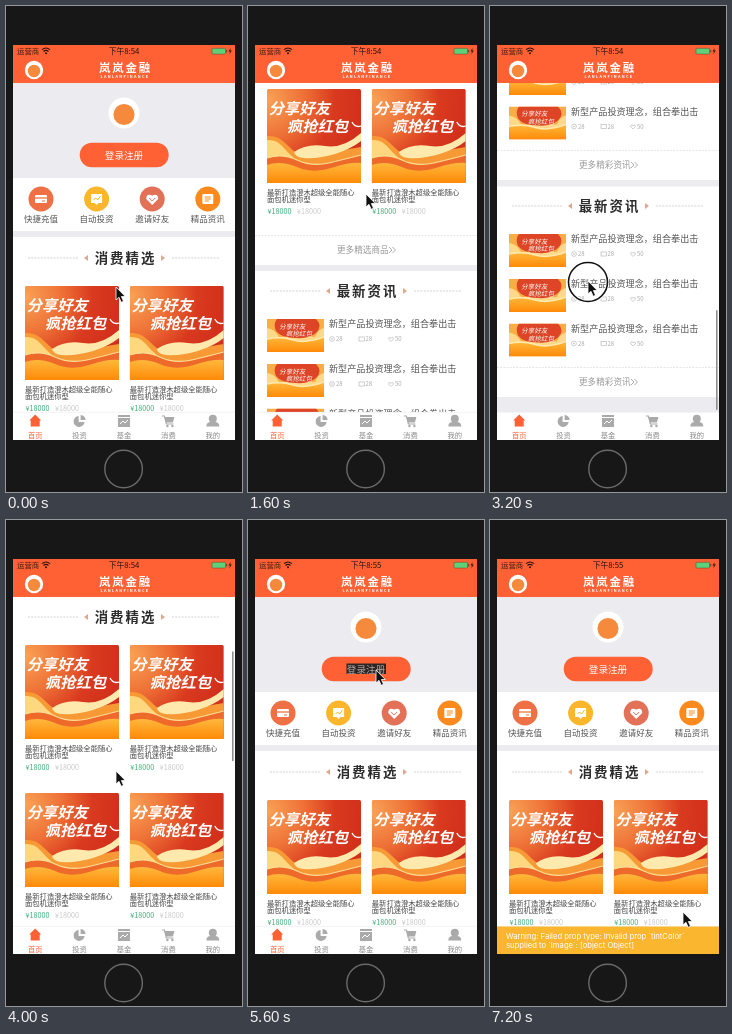
Animation, 236 px wide and 486 px high, one loop 8000 ms. Source, as an HTML page:

```html
<!DOCTYPE html>
<html lang="zh-CN">
<head>
<meta charset="utf-8">
<title>App demo</title>
<style>
html, body { margin: 0; width: 100%; height: 100%; overflow: hidden; background: #171717; }
svg { display: block; width: 100vw; height: 100vh; }
text { font-family: "Noto Sans CJK SC", "Noto Sans CJK", "Noto Sans", sans-serif; }
</style>
</head>
<body>
<svg id="stage" viewBox="0 0 236 486" xmlns="http://www.w3.org/2000/svg"></svg>
<script>
const ORANGE = '#ff6034', PALE = '#ebebf0', INK = '#555', DARK = '#171717';

const rect = (x, y, w, h, fill, extra = '') =>
  `<rect x="${x}" y="${y}" width="${w}" height="${h}" fill="${fill}" ${extra}/>`;
const circle = (x, y, r, fill, extra = '') =>
  `<circle cx="${x}" cy="${y}" r="${r}" fill="${fill}" ${extra}/>`;
const path = (d, fill, extra = '') => `<path d="${d}" fill="${fill}" ${extra}/>`;
const line = (d, color, width = 1, extra = '') =>
  path(d, 'none', `stroke="${color}" stroke-width="${width}" ${extra}`);
// y is the vertical middle of the glyphs
const text = (x, y, size, fill, str, extra = '') =>
  `<text x="${x}" y="${y + size * 0.37}" font-size="${size}" fill="${fill}" ${extra}>${str}</text>`;
const mid = (x, y, size, fill, str, extra = '') =>
  text(x, y, size, fill, str, 'text-anchor="middle" ' + extra);
const group = (x, y, body, extra = '') =>
  `<g transform="translate(${x} ${y})" ${extra}>${body}</g>`;

const slogan = 'font-weight="700" transform="translate(7 0) skewX(-12)"';
const defs = `<defs>
  <radialGradient id="sky" cx="0" cy="0.12" r="1">
    <stop offset="0" stop-color="#f9a357"/><stop offset="0.4" stop-color="#ee7036"/>
    <stop offset="0.72" stop-color="#d93a1f"/><stop offset="1" stop-color="#d2301b"/>
  </radialGradient>
  <linearGradient id="gold" x1="0" y1="0" x2="0" y2="1">
    <stop offset="0" stop-color="#ffb83c"/><stop offset="1" stop-color="#ff8a08"/>
  </linearGradient>
  <clipPath id="square"><rect width="94" height="94" rx="1.5"/></clipPath>
  <clipPath id="wide"><rect width="57" height="33"/></clipPath>
  <clipPath id="view"><rect x="7" y="77" width="222" height="329"/></clipPath>
  <g id="poster" clip-path="url(#square)">
    ${rect(0, 0, 94, 94, 'url(#sky)')}
    ${path('M0 47Q10 46 17 53T34 68L94 58V94H0Z', '#f79a35')}
    ${path('M0 51Q9 50 15 57T28 70H0Z', '#ffd77f')}
    ${path('M27 63Q40 54 58 57T94 44V52Q84 60 68 65T36 69Q28 68 27 63Z', '#ffe9ad')}
    ${path('M0 69Q15 64 30 71T62 74T94 66V94H0Z', '#ee6a2a')}
    ${path('M0 76Q14 71 30 78T64 79T94 74V94H0Z', 'url(#gold)')}
    ${line('M0 69Q15 64 30 71T62 74T94 66', '#ffdc94', 1.2)}
    ${text(0, 19.5, 15.4, '#fff', '分享好友', slogan)}
    ${text(22, 37, 15.4, '#fff', '疯抢红包', slogan)}
    ${line('M85 33Q88 39 94 37', '#fff', 1.3)}
  </g>
  <g id="thumb" clip-path="url(#wide)">
    ${rect(0, 0, 57, 33, '#f9ad45')}
    ${path('M0 9Q8 10 12 18H48Q51 10 57 9V24H0Z', '#ffd98a')}
    ${path('M10 0H49Q56 7 49 14Q42 20 29 19Q14 19 9 12Q6 5 10 0Z', '#dd4526')}
    ${path('M0 20Q14 17 26 21T57 18V33H0Z', 'url(#gold)')}
    ${line('M0 20Q14 17 26 21T57 18', '#ffe9ad', 1.6)}
    ${text(14, 7.5, 6.6, '#fff', '分享好友', 'font-weight="500" transform="skewX(-10)"')}
    ${text(22, 15, 6.6, '#fff', '疯抢红包', 'font-weight="500" transform="skewX(-10)"')}
  </g>
</defs>`;

function heading(y, label) {
  const dash = 'stroke-dasharray="2 1.2"';
  return line(`M22 ${y}H72M166 ${y}H214`, '#cfc8c5', 0.8, dash)
    + path(`M82 ${y - 3}V${y + 3}L78 ${y}Z`, '#dfa88e')
    + path(`M155 ${y - 3}V${y + 3}L159 ${y}Z`, '#dfa88e')
    + mid(119.5, y, 13.4, '#2c2c2c', label, 'font-weight="700" letter-spacing="2"');
}

function card(x, y) {
  return group(x, y, '<use href="#poster"/>'
    + text(0, 103, 7.3, '#444', '最新打造澄木超级全能随心')
    + text(0, 110.5, 7.3, '#444', '面包机迷你型')
    + text(0.5, 122, 7.2, '#3fae78', '¥18000')
    + text(30, 122, 7.2, '#c8c8c8', '¥18000'));
}

function news(y) {
  const icons = [
    circle(3, 20, 2.4, 'none', 'stroke="#bbb" stroke-width=".7"') + circle(3, 20, 0.8, '#bbb'),
    rect(0.5, 18, 5.5, 4, 'none', 'stroke="#bbb" stroke-width=".7"'),
    line('M3 22.5L.5 20Q.5 17.5 3 19Q5.5 17.5 5.5 20Z', '#bbb', 0.7)
  ];
  const counts = [28, 28, 50];
  return group(19, y, '<use href="#thumb"/>'
    + text(62, 5, 9.1, INK, '新型产品投资理念，组合拳出击')
    + icons.map((icon, i) => group(62 + i * 29.5, 0, icon + text(7, 20, 6, '#aaa', counts[i]))).join(''));
}

const more = (y, label) =>
  line(`M7 ${y - 14.5}H229`, '#ddd', 0.7, 'stroke-dasharray="2 1.2"')
  + text(89, y, 8.6, '#999', label)
  + line(`M141 ${y - 3}l3 3l-3 3M144.5 ${y - 3}l3 3l-3 3`, '#999', 0.8);

const avatar = (x, y, r) => circle(x, y, r, '#fff') + circle(x, y + r * 0.1, r * 0.68, '#f58a3c');

function shortcuts() {
  const glyph = [
    rect(-6, -4, 12, 8, '#fff', 'rx="1"') + line('M-6 -1H6', '#f0743f', 1.3) + line('M1 2H4', '#f0743f', 1),
    path('M-5.5 -5H5.5V4H2L0 6L-2 4H-5.5Z', '#fff') + line('M-3 1L-1 -1L1 1L4 -3', '#fbb62c', 1),
    path('M0 6L-6 0Q-6 -6 0 -3.5Q6 -6 6 0Z', '#fff') + line('M-3 -1L0 2L3 -1', '#e27158', 1),
    rect(-5.5, -5, 11, 10, '#fff', 'rx="1"') + line('M-3 -2H3M-3 0H3M-3 2H1', '#fb8a1e', 1)
  ];
  const items = [['快捷充值', '#ee7044'], ['自动投资', '#fbb62c'], ['邀请好友', '#e27158'], ['精品资讯', '#fb8a1e']];
  return items.map(([label, color], i) => {
    const x = 35 + i * 55.6;
    return circle(x, 193, 12.5, color) + group(x, 193, glyph[i]) + mid(x, 213, 8.5, INK, label);
  }).join('');
}

function feed() {
  const list = y => [0, 45, 89.5].map(d => news(y + d)).join('');
  return rect(7, 77, 222, 980, '#fff')
    + rect(7, 77, 222, 95, PALE) + avatar(118, 107, 15.5)
    + rect(73.7, 136.8, 89, 24.4, ORANGE, 'rx="12.2"')
    + rect(98.5, 143.5, 39.5, 10.5, '#2b2625', 'id="shade"')
    + mid(118, 149, 9.6, '#fff', '登录注册', 'id="login"')
    + shortcuts()
    + rect(7, 225, 222, 6, PALE) + heading(252, '消费精选')
    + [280, 428].map(y => card(19, y) + card(123.8, y)).join('')
    + more(589, '更多精选商品') + rect(7, 604, 222, 6, PALE)
    + heading(630, '最新资讯') + list(658) + more(806, '更多精彩资讯')
    + rect(7, 821, 222, 6.5, PALE)
    + heading(847, '最新资讯') + list(875) + more(1023, '更多精彩资讯')
    + rect(7, 1038, 222, 20, PALE);
}

function tabs() {
  const gray = '#aaa';
  const icons = [
    path('M0 -6.5L6 -.5H4.5V5.5H-4.5V-.5H-6Z', ORANGE),
    path('M-1 -5A5.5 5.5 0 1 0 5 1H-1Z', gray) + path('M1 -6A5.5 5.5 0 0 1 6 -1H1Z', gray),
    rect(-6, -6, 12, 2, gray) + rect(-6, -3, 12, 9, gray) + line('M-4 3L-1 0L1 2L4 -1', '#fff', 1),
    line('M-6.5 -5H-4L-2 3H5', gray, 1.2) + path('M-4 -4H6L4.5 1.5H-2.5Z', gray)
      + circle(-1, 5, 1.2, gray) + circle(4, 5, 1.2, gray),
    circle(0, -2.3, 4, gray) + path('M-6.5 5.5Q-6.5 1 -2 1H2Q6.5 1 6.5 5.5Z', gray)
  ];
  return rect(7, 406, 222, 28, '#fff') + line('M7 406.3H229', '#e4e4e4', 0.5)
    + ['首页', '投资', '基金', '消费', '我的'].map((label, i) => {
      const x = 29.2 + i * 44.4;
      return group(x, 415, icons[i]) + mid(x, 429, 7.3, i ? '#888' : ORANGE, label);
    }).join('');
}

function status() {
  return text(11, 45, 7.4, '#3c1a12', '运营商')
    + line('M36 43.7Q40 40.3 44 43.7M37.5 45.5Q40 43.3 42.5 45.5', '#2a1410', 1.1)
    + circle(40, 47.3, 1, '#2a1410')
    + mid(118, 45, 7.8, '#2a1410', '', 'id="clock" font-weight="500"')
    + rect(206, 42.3, 13.5, 5.8, '#5fd07a', 'rx="1" stroke="#7a4a30" stroke-width=".6"')
    + rect(220, 44, 1.2, 2.4, '#7a4a30')
    + path('M224.5 42L222.5 45.6H224L223.3 48.5L225.8 44.6H224.3Z', '#3c1a12');
}

const homeBar = avatar(28, 64, 9.2)
  + mid(119.5, 61.8, 11.4, '#fff', '岚岚金融', 'font-weight="700" letter-spacing="1.9"')
  + mid(119, 70.3, 3.9, '#fff', 'LANLANFINANCE', 'letter-spacing="1.3" font-weight="600"');

const advice = rect(7, 77, 222, 329, DARK) + rect(7, 77, 222, 18, PALE)
  + rect(7, 406, 222, 28, DARK)
  + rect(11, 98, 55, 56, PALE) + rect(11, 166, 55, 168, PALE)
  + rect(72, 98, 153.5, 236, '#ff2600')
  + rect(11, 340, 57, 67, '#0433ff') + rect(74, 340, 114.5, 67, PALE)
  + rect(194, 340, 32, 42.5, PALE) + rect(191, 384.5, 38, 1.2, '#fff')
  + rect(194, 388, 32, 19, '#fbb62f')
  + mid(118.5, 63.5, 10.6, '#fff', '咨询') + line('M18 60L14 64L18 68', '#fff', 1.1);

const latin = 'style="font-family:Inter,\'Noto Sans\',sans-serif"';
const warning = rect(7, 406.5, 222, 27.5, '#fbb62f')
  + text(16, 416, 7.7, '#fff', 'Warning: Failed prop type: Invalid prop `tintColor`', latin)
  + text(16, 425.5, 7.7, '#fff', 'supplied to `Image`: [object Object]', latin);

const stage = document.getElementById('stage');
stage.innerHTML = defs + rect(0, 0, 236, 486, DARK)
  + circle(117.6, 463, 18.8, 'none', 'stroke="#6a6a6a" stroke-width="1.4"')
  + `<g id="home"><g clip-path="url(#view)"><g id="feed">${feed()}</g>
     ${rect(226, 0, 1.6, 0, '#8f8f8f', 'rx=".8" id="bar"')}</g>${tabs()}</g>`
  + rect(7, 39, 222, 38, ORANGE) + status()
  + `<g id="brand">${homeBar}</g><g id="advice">${advice}</g><g id="warning">${warning}</g>`
  + `<g id="pointer"><g id="ring">
     ${circle(0, 1, 19.5, 'none', 'stroke="#fff" stroke-width="3"')}
     ${circle(0, 1, 19.5, 'none', 'stroke="#111" stroke-width="1.6"')}</g>
     ${path('M0 0V13L3 10.3L5.2 15.3L7.5 14.3L5.4 9.5H9.3Z', '#111', 'stroke="#fff" stroke-width=".8"')}</g>`;

const el = id => document.getElementById(id);
const show = (id, on) => el(id).setAttribute('display', on ? 'inline' : 'none');

const STEP = 800, MAX_SCROLL = 637, BAR = 110, TRACK = 325;
const shots = [
  { scroll: 0, x: 110, y: 281 },
  { scroll: 150, x: 114, y: 235, bar: 1 },
  { scroll: 345, x: 118, y: 188 },
  { scroll: 510, x: 104, y: 235, bar: 1 },
  { scroll: 647, x: 98, y: 275, bar: 1, ring: 1 },
  { scroll: 155, x: 110, y: 251, bar: 1 },
  { scroll: 0, x: 116, y: 200 },
  { scroll: 0, x: 128, y: 150, late: 1, pressed: 1 },
  { scroll: 0, x: 19, y: 63, late: 1, ring: 1, advice: 1, warning: 1 },
  { scroll: 0, x: 193, y: 392, late: 1, warning: 1 }
];

// the bar shrinks against the end while the list is pulled past it
function placeBar(scroll) {
  const over = Math.max(0, scroll - MAX_SCROLL);
  el('bar').setAttribute('y', 79 + (scroll - over) / MAX_SCROLL * (TRACK - BAR) + over);
  el('bar').setAttribute('height', BAR - over);
}

function draw(ms) {
  const s = shots[Math.floor(ms / STEP) % shots.length];
  el('feed').setAttribute('transform', `translate(0 ${-s.scroll})`);
  placeBar(s.scroll);
  el('pointer').setAttribute('transform', `translate(${s.x} ${s.y})`);
  el('login').setAttribute('fill', s.pressed ? '#b9aaa5' : '#fff');
  el('clock').textContent = s.late ? '下午8:55' : '下午8:54';
  show('shade', s.pressed);
  show('bar', s.bar);
  show('ring', s.ring);
  show('home', !s.advice);
  show('brand', !s.advice);
  show('advice', s.advice);
  show('warning', s.warning);
}

let start;
function tick(now) {
  start ??= now;
  draw(now - start);
  requestAnimationFrame(tick);
}
draw(0);
requestAnimationFrame(tick);
</script>
</body>
</html>
```
